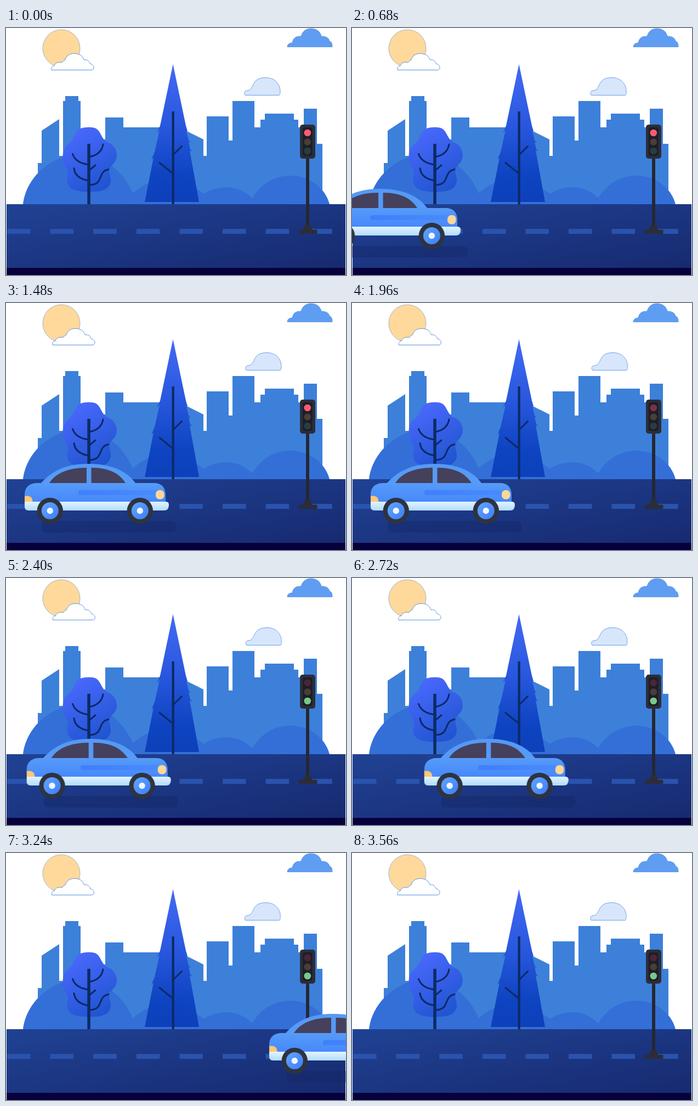
Recreate the animation shown at these times as an HTML page. Size 620 by 450 pixels, loop 4.08 s.

```html
<!DOCTYPE html>
<html lang="en">
<head>
<meta charset="utf-8">
<title>Car at the lights</title>
<style>
  html, body { margin: 0; width: 100%; height: 100%; overflow: hidden; background: #fff; }
  svg { display: block; width: 100%; height: 100%; }
  .line { fill: none; stroke: #0c2a66; stroke-width: 3; stroke-linecap: round; }
</style>
</head>
<body>
<svg viewBox="0 0 620 450">
  <defs>
    <linearGradient id="crown" x1=".2" y1="0" x2=".7" y2="1">
      <stop offset=".1" stop-color="#4767fa"/><stop offset="1" stop-color="#1f54d0"/>
    </linearGradient>
    <linearGradient id="pine" x1="0" y1="0" x2="0" y2="1">
      <stop offset="0" stop-color="#4369f4"/><stop offset=".45" stop-color="#2857dd"/><stop offset=".8" stop-color="#0e44c2"/><stop offset="1" stop-color="#0d40ba"/>
    </linearGradient>
    <linearGradient id="road" x1="0" y1="0" x2="1" y2="1">
      <stop offset="0" stop-color="#204294"/><stop offset="1" stop-color="#172a70"/>
    </linearGradient>
    <linearGradient id="paint" x1="0" y1="0" x2="0" y2="1">
      <stop offset="0" stop-color="#5599f5"/><stop offset=".5" stop-color="#569bf8"/><stop offset="1" stop-color="#4788fc"/>
    </linearGradient>
    <linearGradient id="stripe">
      <stop offset="0" stop-color="#3f80fb"/><stop offset="1" stop-color="#4a8cfd"/>
    </linearGradient>
    <linearGradient id="bumper" x1="0" y1="0" x2="0" y2="1">
      <stop offset="0" stop-color="#e2f4ff"/><stop offset="1" stop-color="#b2dcfc"/>
    </linearGradient>
    <linearGradient id="rim" x1="0" y1="0" x2="1" y2="1">
      <stop offset="0" stop-color="#62a5fb"/><stop offset="1" stop-color="#3d7dfa"/>
    </linearGradient>
    <g id="wheel">
      <circle r="23.7" fill="#2e333f"/>
      <circle r="15.5" fill="url(#rim)"/>
      <circle r="5.7" fill="#eef7ff"/>
    </g>
  </defs>

  <!-- sky -->
  <circle cx="101" cy="37" r="34" fill="#ffd99b" stroke="#7f9cc4" stroke-width=".7"/>
  <path class="drift" fill="#fff" stroke="#5b93e0" d="M83 76.5C82 71 85 69 88 69C89 64 95 61 102 63C104 60 106 59 108 58C110 50 117 46.5 124 46.5C133 46.5 140 50 142 58C148 57 152 60 153 65C158 66 160 69 160 72C160 75 158 76.5 155 76.5Z"/>
  <path class="drift" fill="#d8e6fb" stroke="#6b9fe8" d="M436 122.5C433 118 436 113 441 114C449 112 449 104 454 98C459 91 468 90.5 474 90.5C490 90.5 500 102 500 115C500 118 500 122 498 122.5Z"/>
  <path fill="#5f9df2" stroke="#4687e0" stroke-width=".7" d="M513 34.5C513 29 518 27 522 27C524 18 528 15 538 15C541 5 548 1 556 1C566 1 573 6 575 15C585 15 589 19 590 24C594 25 595 29 595 34.5Z"/>

  <!-- town and hills -->
  <path fill="#3d80d9" d="M58 321V246H65V187L97 166V233H104V133H108V124H132V133H136V203H181V163H214V181H327L330 188L360 203V233H366V161H406V205H413V133H453V181H464V167H472V156H525V167H533V181H543V147H567V211H577V321Z"/>
  <path fill="#346fd8" d="M31 321C37 270 85 231 131 231C180 231 215 262 231 301C250 285 265 277 290 277C320 277 345 290 361 302C372 294 388 290 403 290C420 290 438 298 449 310C465 283 490 269 519 269C552 269 582 290 590 321Z"/>

  <!-- trees -->
  <path fill="url(#crown)" d="M136 183C145 180 158 180 164 183C172 187 174 200 182 207C194 210 202 220 202 232C202 244 194 248 189 255C186 262 192 270 191 280C189 292 178 297 165 298C150 299 130 299 120 293C111 287 110 278 113 266C114 258 105 252 104 240C102 225 107 217 114 211C124 206 124 188 136 183Z"/>
  <path class="line" d="M151 249Q127 246 121.500 229.500M151 235Q174 231 177 212M151 260L163 250M151 278Q126 274 124 255.500M151 286C180 286 165 262 187 257.500"/>
  <path fill="#0c2a66" d="M148.300 211H153.800V321H148.300Z"/>
  <path fill="url(#pine)" d="M304.500 66L328 178L331 188H329L333 205L337 209L333 208L336 221L340 225L335 223L352 317H253L269 236L265 240L271 226L280 186L275 191L281 178Z"/>
  <path class="line" d="M304 265L280 245.500M304 232L320.500 215.500"/>
  <path fill="#0c2a66" d="M302.500 152H306.800V321H302.500Z"/>

  <!-- road -->
  <path fill="url(#road)" d="M1 321H619V437H1Z"/>
  <path fill="#07003c" d="M1 437H619V450H1Z"/>
  <path stroke="#2a53ae" stroke-width="9" stroke-dasharray="42.500 36.100" d="M2 370.500H596"/>

  <!-- traffic light -->
  <g fill="#2b2d39">
    <path fill="#252833" d="M547 236H553V362H547Z"/>
    <path d="M545 359H555L558 368H542Z"/>
    <rect x="534" y="367.500" width="33.500" height="7.500" rx="2"/>
    <rect x="536" y="176" width="28" height="62" rx="5"/>
    <rect x="541" y="181" width="17.500" height="52" rx="4" fill="#1c1e29"/>
  </g>
  <circle cx="549.800" cy="191" r="6.300" fill="#4b2536"/>
  <circle cx="549.800" cy="207.500" r="6.300" fill="#4a3e35"/>
  <circle cx="549.800" cy="224" r="6.300" fill="#293d40"/>
  <circle id="red" cx="549.800" cy="191" r="6.300" fill="#ff5c70"/>
  <circle id="green" cx="549.800" cy="224" r="6.300" fill="#78c98a"/>

  <!-- car -->
  <g id="car">
    <rect x="65" y="397" width="245" height="21" rx="9" fill="#152665" opacity=".4"/>
    <path fill="url(#paint)" d="M34 363V349C34 336 42 328 58 328H64C80 311 102 293 150 293C200 293 225 312 236 328H270C285 328 291 338 291 350V363Z"/>
    <path fill="url(#stripe)" d="M136 341H289Q291 345 291 350H136Q132 350 132 345.500Q132 341 136 341Z"/>
    <path fill="#45405c" d="M79 328C90 311 112 300 147 300V328ZM155.500 300C190 300 208 312 218 328H155.500Z"/>
    <path fill="#ffc674" d="M34 351.500H39C46 352 48.500 356 48.500 362H34Z"/>
    <rect x="273" y="341" width="15.500" height="16.500" rx="6.500" fill="#ffd796"/>
    <path fill="url(#bumper)" d="M34 362H292Q297 362 297 368Q297 378 288 378H41Q34 378 34 371Z"/>
    <use href="#wheel" x="80.300" y="378.500"/>
    <use href="#wheel" x="244.300" y="378.500"/>
  </g>
</svg>
<script>
  const LOOP = 4080;

  // steps: [time in ms, value]; every stretch eases in and out
  function play(el, prop, steps, css = v => v) {
    const all = [[0, steps[0][1]], ...steps, [LOOP, steps[steps.length - 1][1]]];
    const keys = all.map(([t, v]) => ({ offset: t / LOOP, [prop]: css(v), easing: 'ease-in-out' }));
    el.animate(keys, { duration: LOOP, iterations: Infinity }).startTime = 0 + start;
  }

  const start = document.timeline.currentTime || 0;
  const shift = x => `translate(${x}px, 0px)`;
  const byId = id => document.getElementById(id);

  play(byId('car'), 'transform', [[0, -310], [1120, 0], [2320, 0], [3775, 620]], shift);
  play(byId('red'), 'opacity', [[1700, 1], [2100, 0]]);
  play(byId('green'), 'opacity', [[2000, 0], [2420, 1]]);
  for (const cloud of document.querySelectorAll('.drift'))
    play(cloud, 'transform', [[500, 0], [1900, 2.4], [2300, 2.4], [3560, 0]], shift);
</script>
</body>
</html>
```
